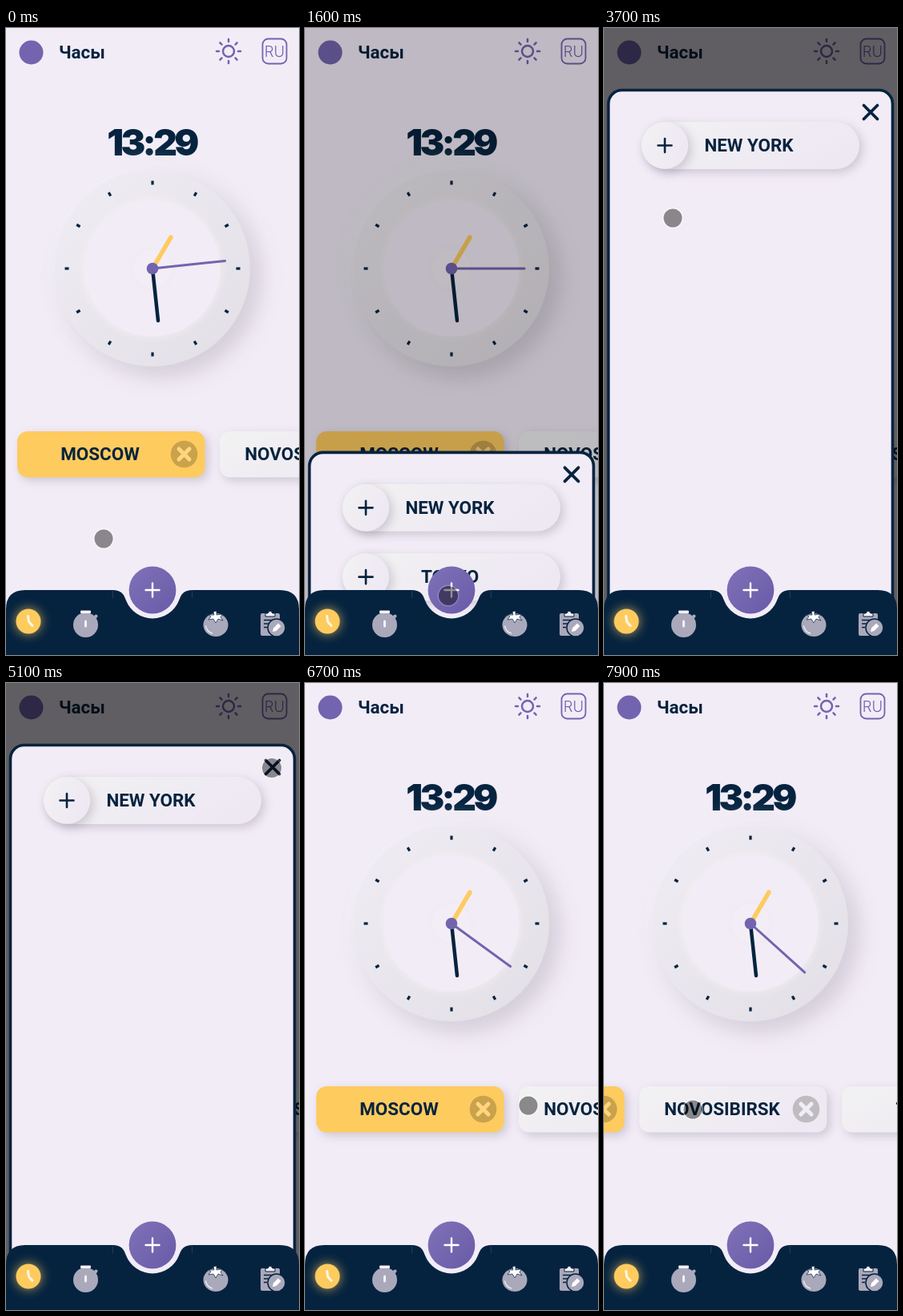
An HTML page for the animation above (8000 ms loop, 366 px wide and 782 px high).

```html
<!DOCTYPE html>
<html lang="ru">
<head>
<meta charset="utf-8">
<title>Часы</title>
<style>
  html, body { margin: 0; width: 100%; height: 100%; overflow: hidden; background: #f2ecf7; }
  svg { display: block; width: 366px; height: 782px; }
  text { font: 700 22.4px Roboto, Arial, sans-serif; fill: #05233f; }
  .mid { text-anchor: middle; }
  .line { fill: none; stroke-linecap: round; stroke-linejoin: round; }
  .violet { stroke: #7264ae; }
  .navy { stroke: #05233f; }
  .dial { filter: drop-shadow(12px 12px 14px rgba(70, 60, 80, .17)) drop-shadow(-6px -6px 14px rgba(255, 255, 255, .5)) drop-shadow(0 0 14px rgba(90, 85, 95, .06)); }
  .face { filter: drop-shadow(0 0 6px rgba(255, 255, 255, .45)); }
  .raised { filter: drop-shadow(4px 4px 6px rgba(60, 50, 70, .2)); }
  .glow { filter: drop-shadow(0 0 7px rgba(254, 203, 95, .75)); }
</style>
</head>
<body>
<svg viewBox="0 0 366 782">
  <defs>
    <linearGradient id="rim" x1="0" y1="0" x2="1" y2="1">
      <stop offset=".1" stop-color="#efebf2"/><stop offset=".9" stop-color="#e4e0e7"/>
    </linearGradient>
    <linearGradient id="pale" x1="0" y1="0" x2="1" y2=".4">
      <stop offset="0" stop-color="#f2f2f2"/><stop offset="1" stop-color="#eee8f3"/>
    </linearGradient>
    <linearGradient id="plum" x1="0" y1="0" x2="1" y2="1">
      <stop offset="0" stop-color="#7f72b8"/><stop offset="1" stop-color="#695aa6"/>
    </linearGradient>
    <radialGradient id="hub">
      <stop offset=".5" stop-color="#ebe7ee"/><stop offset="1" stop-color="#f2ecf7" stop-opacity="0"/>
    </radialGradient>
  </defs>

  <circle cx="31.5" cy="30.5" r="15" fill="#7264ae"/>
  <text x="66" y="38">Часы</text>
  <g class="line violet" stroke-width="2.5">
    <circle cx="278" cy="29" r="7"/>
    <g id="rays"></g>
    <rect x="320.5" y="13.5" width="30" height="31" rx="7" stroke-width="1.8"/>
  </g>
  <text class="mid" x="335.5" y="35.5" style="font:300 18.5px Inter,sans-serif;fill:#7264ae">RU</text>

  <text class="mid" x="182" y="158.5" style="font:900 46px Inter,sans-serif;letter-spacing:-3.6px">13:29</text>
  <circle class="dial" cx="183" cy="300" r="122" fill="url(#rim)"/>
  <circle class="face" cx="183" cy="300" r="84.5" fill="#f2ecf7"/>
  <circle cx="183" cy="300" r="34" fill="url(#hub)"/>
  <circle cx="183" cy="300" r="24" fill="#f3eef6"/>
  <g id="ticks" class="navy" stroke-width="3.2"></g>
  <g class="line" transform="translate(183 300)">
    <path d="M0 0L23-39" stroke="#fecb5f" stroke-width="5.5"/>
    <path class="navy" d="M0 0L7 65" stroke-width="4.5"/>
    <path id="second" class="violet" d="M0 0V-91" stroke-width="3"/>
    <circle r="7.3" fill="#7264ae"/>
  </g>

  <g id="cards"></g>

  <g id="modal">
    <rect id="shade" width="366" height="782"/>
    <g id="sheet">
      <rect x="5.5" y="77.5" width="355" height="730" rx="17" fill="#f2ecf7" class="navy" stroke-width="3.6"/>
      <path class="line navy" d="M324.5 96.500l17 17m0-17l-17 17" stroke-width="3.8"/>
      <g id="pills"></g>
    </g>
  </g>

  <path fill="#05233f" d="M0 782V725Q0 701 24 701H133C144 701 147 706 150 714A35.500 35.500 0 0 0 216 714C219 706 222 701 233 701H342Q366 701 366 725V782Z"/>
  <path d="M133.500 702v9M232.500 702v9" stroke="#294560" stroke-width=".8"/>
  <circle cx="183" cy="701" r="29.400" fill="url(#plum)"/>
  <path class="line" d="M174.500 701h17M183 692.500v17" stroke="#fff" stroke-width="2.400"/>

  <circle class="glow" cx="28" cy="740" r="15.5" fill="#fecb5f"/>
  <path class="line" d="M27.500 733.500l1 7 4.500 5" stroke="#fff6e4" stroke-width="3"/>

  <g fill="#aaa9bb">
    <circle cx="99.500" cy="744.500" r="15.5"/>
    <path class="line" d="M110 736l2.500-2.500" stroke="#aaa9bb" stroke-width="4"/>
    <rect x="97" y="727" width="5" height="5"/>
    <rect x="93" y="726.500" width="13" height="3.500" rx="1" fill="#f4f1f7"/>
    <rect x="98" y="738.500" width="3" height="9" rx="1.500" fill="#f4f1f7"/>

    <ellipse cx="262" cy="744.500" rx="15.500" ry="14.500"/>
    <path class="line" d="M249.500 746q1.500 7 8 9" stroke="#e9e6ee" stroke-width="1.500"/>
    <path d="M260 732l-1-4 4-1v5l7-1-2 4 3 4-6-2-3 5-3-5-6 1 3-4-3-2z" fill="#fff" class="navy" stroke-width=".7"/>

    <rect x="318" y="730" width="24" height="28" rx="2"/>
    <path d="M324 734v-4h3q3-6 6 0h3v4z" fill="#f4f1f7" class="navy" stroke-width="1"/>
    <path d="M322 738.500h15M322 743h7M322 747.500h4" stroke="#05233f" stroke-width="1.300"/>
    <circle cx="338" cy="748" r="11" class="navy" stroke-width="1.500"/>
    <path d="M333 753l1-4.500 6-6 3.500 3.500-6 6z" fill="#fff"/>
  </g>

  <g id="cursor">
    <circle id="halo" r="12.300" fill="none" stroke="#fff" stroke-width="1.500"/>
    <circle id="dot" r="11.500" fill="#000" fill-opacity=".43"/>
  </g>
</svg>
<script>
const $ = id => document.getElementById(id);
const LOOP = 8000, STEP = 100;

const spokes = (n, cx, cy, r1, r2) => Array.from({ length: n }, (_, i) =>
  `<path d="M0 ${-r1}V${-r2}" transform="translate(${cx} ${cy}) rotate(${i * 360 / n})"/>`).join('');

const card = (name, i) => `<g transform="translate(${14 + i * 253} 503)">
  <rect class="raised" width="234.5" height="57.5" rx="13" fill="${i ? 'url(#pale)' : '#fecb5f'}"/>
  <text class="mid" x="103.5" y="36">${name}</text>
  <circle cx="208.5" cy="28.500" r="16.800" fill="${i ? '#bfbcc1' : '#cba24c'}"/>
  <path class="line" d="M202 22l13 13m0-13l-13 13" stroke="${i ? '#f1edf4' : '#ffd57f'}" stroke-width="5"/></g>`;

const pill = (name, i) => `<g id="pill${i}" transform="translate(47 ${117 + i * 86.3})">
  <rect class="raised" width="272" height="59" rx="29.500" fill="url(#pale)"/>
  <circle class="raised" cx="29" cy="29.500" r="29.300" fill="url(#pale)"/>
  <path class="line navy" d="M20.500 29.500h17M29 21v17" stroke-width="2.600"/>
  <text class="mid" x="134" y="37">${name}</text></g>`;

$('rays').innerHTML = spokes(8, 278, 29, 12, 15);
$('ticks').innerHTML = spokes(12, 183, 300, 104.500, 109.500);
$('cards').innerHTML = ['MOSCOW', 'NOVOSIBIRSK', 'TOKYO'].map(card).join('');
$('pills').innerHTML = ['NEW YORK', 'TOKYO'].map(pill).join('');

// Rows: time, then values
const hand = [[0, 84], [600, 84], [700, 90], [1600, 90], [1700, 96], [5500, 114], [5700, 114],
  [5800, 120], [6500, 120], [6600, 123], [6700, 126], [7500, 126], [7600, 130], [7700, 132]];
const touch = [[0, 122, 637], [500, 122, 637], [1000, 179, 708], [2100, 179, 708], [2200, 176, 639],
  [2400, 159, 437], [2900, 159, 437], [3000, 86, 239], [3600, 86, 239], [3700, 86, 237],
  [4100, 86, 237], [5000, 332, 107], [5100, 332, 106], [5700, 332, 106], [6600, 279, 527],
  [6800, 279, 527], [7700, 47, 533], [7900, 111, 532]];
const scroll = [[0, 0], [6800, 0], [7700, 223]];
const open = [[0, 0], [1500, 0], [2000, 1]];
const presses = [[1100, 2200], [3000, 3700], [5100, 5800], [6900, 7800]];

const linear = k => k;
const smooth = k => k * k * (3 - 2 * k);
const easeOut = k => 1 - (1 - k) ** 2;

function at(rows, t, ease = linear) {
  const i = rows.findIndex(row => row[0] > t);
  if (i < 0) return rows[rows.length - 1].slice(1);
  const a = rows[i - 1], b = rows[i];
  const k = ease((t - a[0]) / (b[0] - a[0]));
  return a.slice(1).map((v, j) => v + (b[j + 1] - v) * k);
}

function draw(t) {
  $('second').setAttribute('transform', `rotate(${at(hand, t)})`);
  $('cards').setAttribute('transform', `translate(${-at(scroll, t, smooth)} 0)`);

  const [shown] = t < 5500 ? at(open, t, easeOut) : [0];
  $('modal').style.display = shown ? '' : 'none';
  $('shade').setAttribute('fill-opacity', .6 * shown);
  $('sheet').setAttribute('transform', `translate(0 ${(1 - shown) * 706})`);
  $('pill1').style.display = t < 3700 ? '' : 'none';

  const down = presses.some(([from, to]) => t >= from && t < to);
  $('cursor').setAttribute('transform', `translate(${at(touch, t, smooth)})`);
  $('halo').setAttribute('r', down ? 12.8 : 12.3);
  $('halo').setAttribute('stroke-opacity', down ? .2 : .5);
  $('dot').setAttribute('r', down ? 12 : 11.5);
}

const start = performance.now();
function tick() {
  const t = (performance.now() - start) % LOOP;
  draw(Math.floor(t / STEP) * STEP);
  requestAnimationFrame(tick);
}
tick();
</script>
</body>
</html>
```
